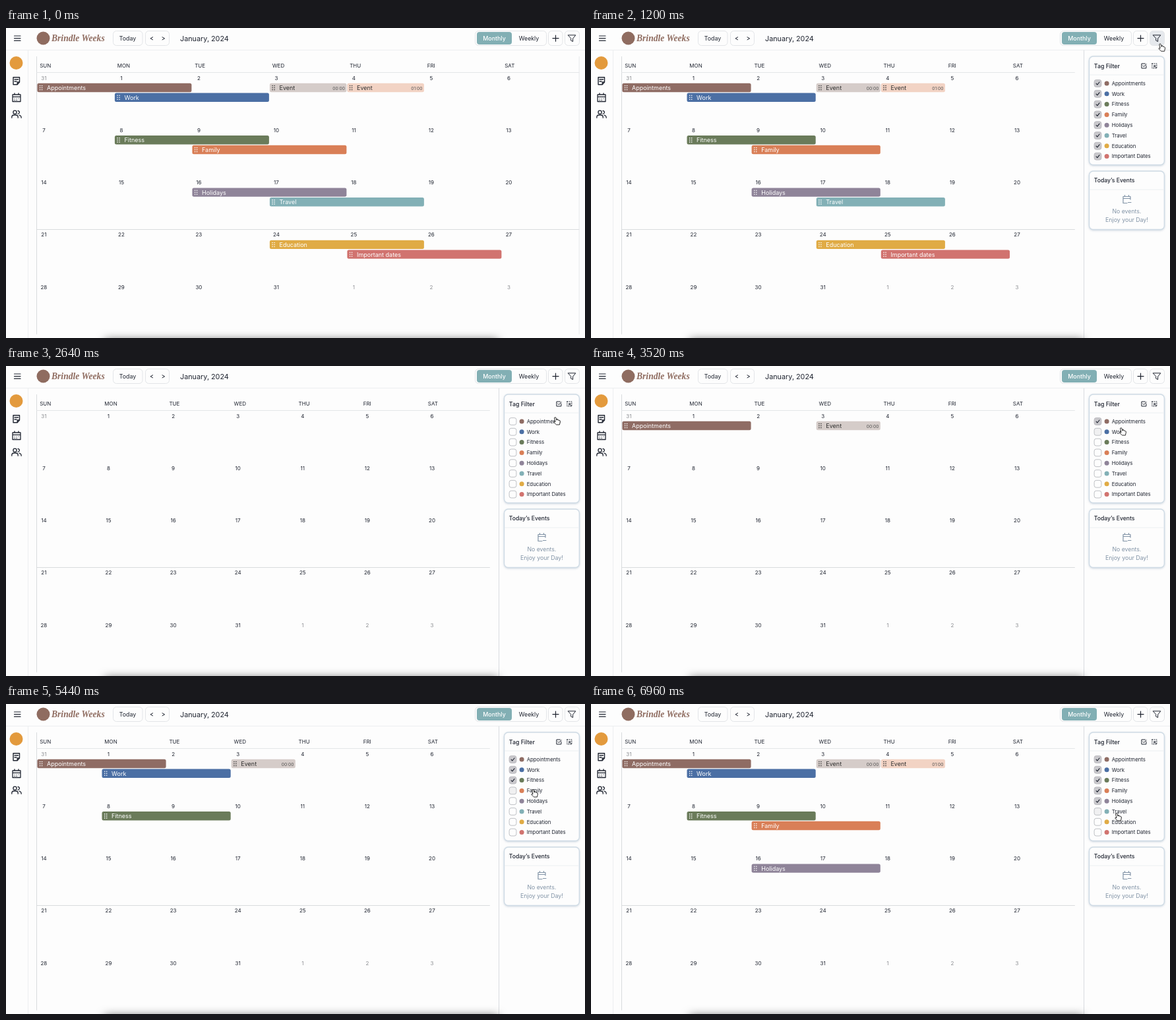
Animation of 878 by 470 pixels, one loop 7040 ms. Source, as an HTML page:

```html
<!DOCTYPE html>
<html lang="en">
<head>
<meta charset="utf-8">
<title>Calendar tag filter</title>
<style>
  html, body { margin: 0; width: 100%; height: 100%; overflow: hidden; background: #fdfdfd; }
  #stage { position: relative; width: 878px; height: 470px; overflow: hidden; }
  #stage > svg { display: block; font-family: Inter, "Open Sans", sans-serif; }
  #shade { position: absolute; left: 152px; top: 474px; width: 592px; height: 20px; box-shadow: 0 0 14px 2px rgba(0,0,0,.55); }
  .card { filter: drop-shadow(0 1px 1.5px rgba(90,120,150,.28)); }
</style>
</head>
<body>
<div id="stage">
  <svg width="878" height="470" viewBox="0 0 878 470"></svg>
  <div id="shade"></div>
</div>
<script>
const LOOP = 7040, OPEN_AT = 720, OPEN_MS = 300, CLEAR_AT = 2080;
const svg = document.querySelector('svg');
const INK = '#1f2430', EDGE = '#e3e5e8', MUTED = '#8193a6';
const LEFT = 46.7, ROW = 79.3;

// name, colour, first column, row, slot in the row, time the tag is switched on again
const tags = [
  ['Appointments', '#8f6c64', 0, 0, 0, 3200],
  ['Work', '#4b6fa4', 1, 0, 1, 3950],
  ['Fitness', '#6a7b5a', 1, 1, 0, 4800],
  ['Family', '#d97f57', 2, 1, 1, 5680],
  ['Holidays', '#8f8499', 2, 2, 0, 6400],
  ['Travel', '#82b0b6', 3, 2, 1, LOOP],
  ['Education', '#e0ab45', 3, 3, 0, LOOP],
  ['Important Dates', '#d1736f', 4, 3, 1, LOOP]
];
// tag index, column, colour, time of day
const events = [[0, 3, '#d5ccc9', '00:00'], [3, 4, '#f2d3c4', '01:00']];

// time, x, y of the pointer's centre
const path = [
  [300, 886, 140], [640, 867, 26], [1100, 867, 26], [1650, 858, 62],
  [2240, 858, 62], [2640, 836, 83], [2900, 812, 86], [3250, 810, 86],
  [3500, 807, 99], [4050, 806, 100], [4350, 804, 118], [4900, 804, 118],
  [5250, 802, 135], [5750, 802, 135], [6100, 800, 153], [6480, 800, 153],
  [6850, 800, 171], [LOOP, 800, 171]
];

const clamp = v => Math.max(0, Math.min(1, v));
const mix = (a, b, p) => a + (b - a) * p;
const text = (x, y, s, size, fill = INK, more = '') =>
  `<text x="${x}" y="${y + size * .36}" font-size="${size}" fill="${fill}" ${more}>${s}</text>`;
const rect = (x, y, w, h, r, fill, stroke = 'none', more = '') =>
  `<rect x="${x}" y="${y}" width="${w}" height="${h}" rx="${r}" fill="${fill}" stroke="${stroke}" ${more}/>`;
const line = (d, stroke = INK, width = 1, more = '') =>
  `<path d="${d}" fill="none" stroke="${stroke}" stroke-width="${width}" stroke-linecap="round" stroke-linejoin="round" ${more}/>`;
const dot = (x, y, r, fill) => `<circle cx="${x}" cy="${y}" r="${r}" fill="${fill}"/>`;
const MIDDLE = 'text-anchor="middle"', MEDIUM = 'font-weight="500"';

function pointerAt(t) {
  const i = path.findIndex(k => k[0] > t);
  if (i < 1) return null;
  const [a, b] = [path[i - 1], path[i]];
  const u = (t - a[0]) / (b[0] - a[0]), e = u * u * (3 - 2 * u);
  return { x: mix(a[1], b[1], e) - 2, y: mix(a[2], b[2], e) - 5 };
}

const isOn = (tag, t) => t < CLEAR_AT || t >= tag[5];

function chrome(hoverFilter) {
  const button = (x, w, fill = '#fdfdfd') => rect(x, 4.5, w, 22, 5, fill, EDGE);
  return line('M0 33.5H878M33.5 34V470', '#eceef0')
    + line('M12.5 12H22M12.5 15.6H22M12.5 19.2H22', INK, 1.2)
    + dot(56.5, 15.5, 10, '#8f6c60')
    + text(69, 15.5, 'Brindle Weeks', 13.6, '#8f6c60',
        'font-family="Liberation Serif, serif" font-weight="700" font-style="italic"')
    + button(162.5, 44.5) + text(184.5, 15.8, 'Today', 8.8, INK, MIDDLE)
    + button(211.5, 36) + line('M222.6 13.8L219 15.8L222.6 17.8M237 13.8L240.6 15.8L237 17.8')
    + text(264, 15.8, 'January, 2024', 10.8)
    + button(711.5, 108) + rect(714, 6, 53, 19, 4, '#82afb4')
    + text(740.5, 15.8, 'Monthly', 8.9, '#fff', MIDDLE + MEDIUM.padStart(18))
    + text(793, 15.8, 'Weekly', 8.8, INK, MIDDLE)
    + button(822.5, 21.5) + line('M829 15.7H838M833.5 11.2V20.2', INK, 1.2)
    + button(847.5, 22, hoverFilter ? '#e6e9ed' : '#fdfdfd')
    + line('M852.5 10.8H863.8L859.6 16V20.5L856.7 19V16Z', INK, 1)
    + dot(15.5, 53, 10, '#e39a3d')
    + line('M11 74.8H20.5V82L17.2 85.8H11ZM20.5 82H17.2V85.8M13 78H18.5M13 81H16', INK, 1.4)
    + line('M10 101H22V111.5H10ZM10 104.4H22M13 99V101M19 99V101', INK, 1.3)
    + line('M13 107H13.2M16 107H16.2M19 107H19.2M13 109.4H13.2M16 109.4H16.2', INK, 1.1)
    + line('M8.8 136.2V134.8Q9 132 12 132H15Q18 132 18.2 134.8V136.2M20 132.2Q23 132.6 23.2 136.2M18 125.3Q20.6 126 20.4 128T18 130.2', INK, 1.3)
    + `<circle cx="13.5" cy="127.7" r="2.6" fill="none" stroke="${INK}" stroke-width="1.3"/>`;
}

function bar(x, y, w, fill, label, ink, time = '') {
  let grip = '';
  for (let i = 0; i < 6; i++) grip += dot(x + 4.2 + i % 2 * 3, y + 3.8 + (i >> 1) * 3, .8, ink);
  return rect(x, y, w, 13.4, 2.5, fill) + grip + text(x + 14.6, y + 6.9, label, 9, ink)
    + (time && text(x + w - 2.5, y + 7.4, time, 6.6, '#555', 'text-anchor="end"'));
}

function calendar(t, open) {
  const right = mix(869.2, 733.4, open), col = (right - LEFT) / 7;
  const colX = c => LEFT + c * col;
  const barX = c => colX(c) + .7, barY = (r, slot) => 83.8 + r * ROW + slot * 14.7;
  let out = line(`M46.5 43.5V464`, '#d9dbde') + line(`M46.5 67.5H${right}`, '#e4e6e8')
    + line(`M46.5 305.5H${right}`, '#d9dbde');
  if (open < 1) out += line(`M${right} 43.5V464`, '#e6e8ea');
  'SUN MON TUE WED THU FRI SAT'.split(' ').forEach((d, c) => out += text(colX(c) + 4.5, 56.8, d, 8));
  for (let i = 0; i < 35; i++) {
    const inMonth = i > 0 && i < 32, day = i === 0 ? 31 : inMonth ? i : i - 31;
    out += text(colX(i % 7) + 10.7, 75.7 + Math.floor(i / 7) * ROW, day, 8, inMonth ? INK : '#8b8d91', MIDDLE);
  }
  tags.forEach(tag => {
    const [name, fill, c, r, slot] = tag;
    const label = name.replace('Dates', 'dates');
    if (isOn(tag, t)) out += bar(barX(c), barY(r, slot), col * 2 - 1, fill, label, '#fff');
  });
  events.forEach(([i, c, fill, time]) => {
    if (isOn(tags[i], t)) out += bar(barX(c), barY(0, 0), col - 1, fill, 'Event', '#303030', time);
  });
  return out;
}

function panel(t, open, tip) {
  if (!open) return '';
  const edge = 879 - 131.5 * open, pad = 8 * open;
  const x = edge + pad, right = 878 - 8.6 * open, w = right - x;
  const top = 35 + pad, scrolls = open < .97, h = scrolls ? 174.5 : 164.5;
  const card = (y, height) => rect(x, y, w, height, 6, '#fdfdfd', '#cfdbe5', 'stroke-width="1.4" class="card"')
    + line(`M${x + 1} ${y + 28}H${right - 1}`, '#eceff2');

  let list = '';
  tags.forEach((tag, i) => {
    const y = 41 + i * 15.8, on = isOn(tag, t);
    const hover = tip && t > CLEAR_AT && tip.x < 820 && Math.abs(tip.y - top - y) < 7.9;
    list += rect(7.6, y - 5.4, 10.8, 10.8, 3, on ? '#c9c8cc' : hover ? '#f0f0f1' : '#fdfdfd', on ? '#bcbbc0' : '#bfc1c5')
      + (on ? line(`M10.6 ${y + .2}l1.7 1.8 3.2-4`, INK, 1.1) : '')
      + dot(26.6, y, 3.5, tag[1]) + text(34.2, y, tag[0], 7.8);
  });

  const low = top + h + 9.5, mid = (x + right) / 2;
  const iy = top + 14.5, a = right - 31, b = right - 15;
  return rect(edge, 34, 140, 440, 0, '#fdfdfd') + line(`M${edge} 34V470`, '#d9dce0')
    + card(top, h) + text(x + 7.3, iy, 'Tag Filter', 8.8, INK, MEDIUM)
    + line(`M${a + 3.5} ${iy - .5}V${iy + 3.5}H${a - 3.5}V${iy - 3.5}H${a + 2}M${a - 1.6} ${iy - .4}l1.6 1.6 3.6-4`)
    + line(`M${b - 3.5} ${iy - 3.5}h7v7h-7z`, INK, 1, 'stroke-dasharray="1 2"')
    + line(`M${b - .5} ${iy - .5}l3.5 3.5M${b - .5} ${iy + 2}v-2.5h2.5`)
    + `<svg x="${x}" y="${top}" width="${w - .8}" height="${h}" overflow="hidden">${list}</svg>`
    + (scrolls ? rect(x + 2, top + h - 10, Math.max(0, w - 9), 8, 3, '#c1cbd3') : '')
    + card(low, 88.5) + text(x + 7.3, low + 14.2, 'Today\u2019s Events', 8.65, INK, MEDIUM)
    + line(`M${mid + 5.5} ${low + 43}v-4.5h-11v10h6M${mid - 5.5} ${low + 41.5}h11M${mid - 3} ${low + 36.5}v2M${mid + 3} ${low + 36.5}v2M${mid + 2} ${low + 47.5}h4.5`, MUTED, 1.2)
    + text(mid, low + 61, 'No events.', 8.7, MUTED, MIDDLE)
    + text(mid, low + 74.3, 'Enjoy your Day!', 8.8, MUTED, MIDDLE);
}

const tooltip = () => rect(827, 70.5, 44.5, 12.5, 2, '#f4f5f6', '#e6e8ea')
  + text(849.5, 76.8, 'Deselect all', 6.8, INK, MIDDLE);

const hand = ({ x, y }) => `<path transform="translate(${x} ${y})" fill="#fff" stroke="#111" stroke-width=".9" stroke-linejoin="round"
  d="M-2.4 1Q-2.2-.4-1-.2Q-.1 0 .2 1L1 4.2Q2-.1 3.2 4.2Q4.8 3.4 5.2 4.8Q6.4 4.6 6.4 6.2L5.8 9.2L5.4 11H.6L-3.2 7.4Q-3.4 6.2-2 6.2L-1 6.8Z"/>`;

function draw(now) {
  const t = now % LOOP;
  const open = 1 - (1 - clamp((t - OPEN_AT) / OPEN_MS)) ** 2.35;
  const tip = pointerAt(t);
  const onFilter = tip && tip.x > 847 && tip.x < 870 && tip.y < 27;
  svg.innerHTML = calendar(t, open) + chrome(onFilter) + panel(t, open, tip)
    + (t > 1700 && t < 2120 ? tooltip() : '') + (tip ? hand(tip) : '');
}

const start = performance.now();
function tick() {
  draw(performance.now() - start);
  requestAnimationFrame(tick);
}
tick();
</script>
</body>
</html>
```
